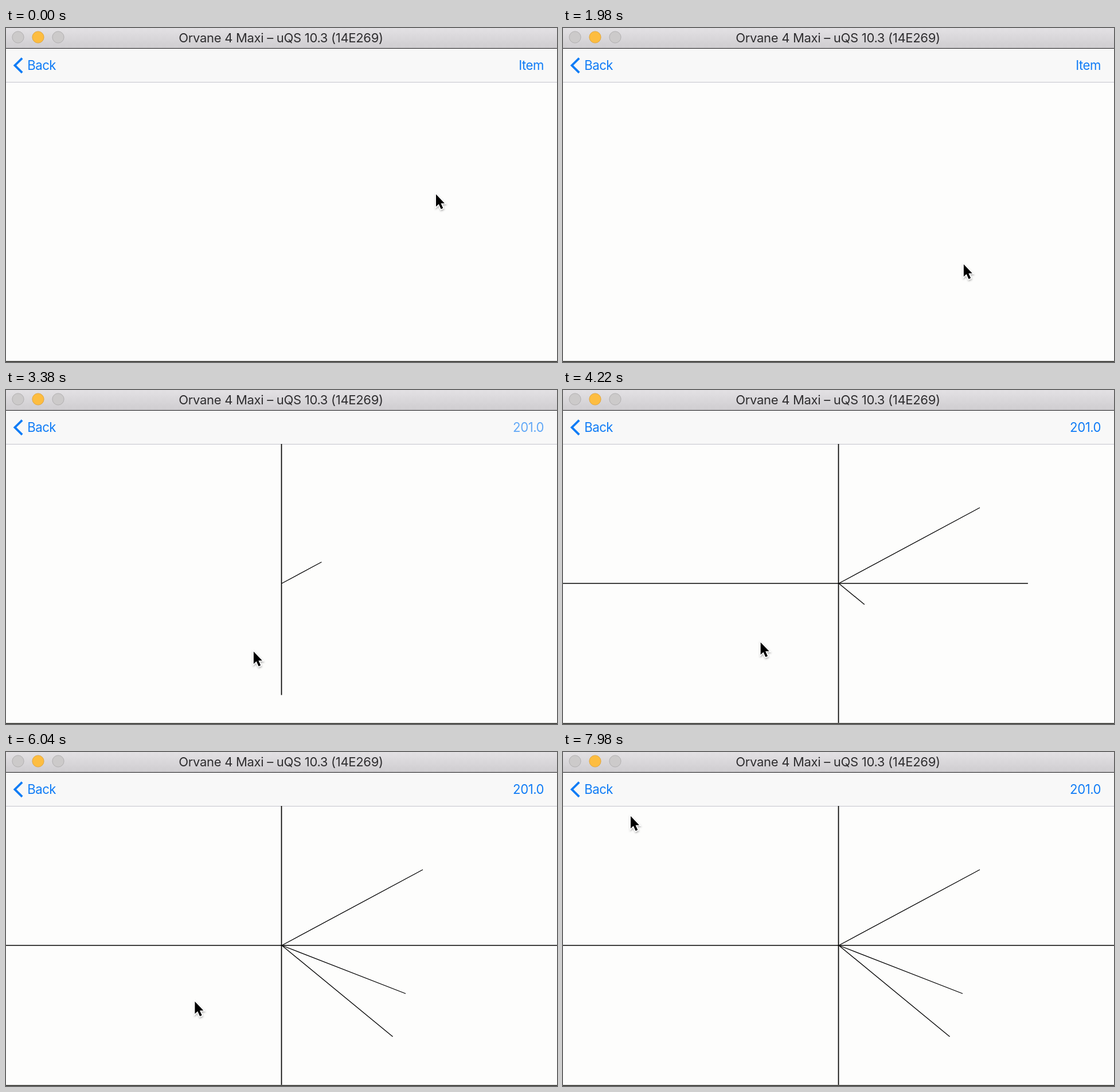
Write an HTML page that moves like this. It is 961 px wide and 582 px high and loops after 8 s.

```html
<!DOCTYPE html>
<html lang="en">
<head>
<meta charset="utf-8">
<title>Axes and rays</title>
<style>
  html, body { margin: 0; width: 100%; height: 100%; overflow: hidden; background: #fdfdfc; }
  svg { display: block; width: 961px; height: 582px; }
  text { font-family: Inter, Roboto, sans-serif; }
  .title { font-size: 22px; letter-spacing: -.3px; fill: #2e2d2f; text-anchor: middle; }
  .nav { font-size: 22.2px; letter-spacing: -.5px; fill: #107cf6; }
  .end { text-anchor: end; }
  .line { stroke: #000; stroke-width: 1.3; }
  .axis { stroke-width: 1.7; }
</style>
</head>
<body>
<svg viewBox="0 0 961 582">
  <defs>
    <linearGradient id="bar" x2="0" y2="1">
      <stop offset="0" stop-color="#e3e1e4"/>
      <stop offset="1" stop-color="#cfcdd0"/>
    </linearGradient>
    <filter id="shadow" x="-50%" y="-50%" width="200%" height="200%">
      <feDropShadow dx="0.5" dy="2" stdDeviation="1.5" flood-opacity=".3"/>
    </filter>
  </defs>

  <rect width="961" height="582" fill="#fdfdfc"/>
  <rect y="36" width="961" height="58" fill="#f8f8f8"/>
  <rect y="94" width="961" height="1" fill="#c4c4cc"/>
  <rect width="961" height="35" fill="url(#bar)"/>
  <rect y="35" width="961" height="1" fill="#1c1c1e"/>
  <g fill="#cccaca" stroke="#b2b0b1">
    <circle cx="21" cy="16" r="10.1"/>
    <circle cx="56" cy="16" r="10.1" fill="#fdbd40" stroke="#e0a640"/>
    <circle cx="91" cy="16" r="10.1"/>
  </g>
  <text class="title" x="479.5" y="24.5">Orvane 4 Maxi – uQS 10.3 (14E269)</text>

  <path d="M28.2 52.6L15.4 65.2L28.2 77.8" fill="none" stroke="#107cf6" stroke-width="3.8"/>
  <text class="nav" x="37.2" y="73">Back</text>
  <text class="nav end" id="label" x="938" y="73">Item</text>

  <g id="lines"></g>
  <rect y="580" width="961" height="1" fill="#777773"/>
  <rect y="581" width="961" height="1" fill="#33332f"/>

  <g id="cursor" filter="url(#shadow)">
    <path d="M0 -1.2V20.3L4.8 15.8L8.7 24.4L12.3 22.8L8.5 14.4H15Z"
          fill="#000" stroke="#fff" stroke-width="3" paint-order="stroke" stroke-linejoin="miter"/>
  </g>
</svg>
<script>
  const LOOP = 8000, DRAW = 890;

  // start time, from x, y, to x, y, class
  const strokes = [
    [2580, 480.5, 94, 480.5, 580, 'line axis'],
    [3470, 0, 337, 961, 337, 'line axis'],
    [3130, 481, 337, 727, 205, 'line'],
    [4015, 481, 337, 674.5, 496, 'line'],
    [4895, 481, 337, 697, 421, 'line']
  ];

  // time, tip x, tip y
  const pointerPath = [
    [0, 750, 291], [1100, 716, 354], [1560, 704, 394], [1980, 699, 413],
    [2400, 640, 434], [3000, 500, 453], [3380, 432, 457], [4200, 345, 441],
    [5160, 328.5, 436], [7120, 330.5, 436], [7440, 290, 362], [7980, 118, 113],
    [8000, 118, 113]
  ];

  const label = document.getElementById('label');
  const cursor = document.getElementById('cursor');
  const group = document.getElementById('lines');
  const clamp = v => Math.min(1, Math.max(0, v));
  const mix = (a, b, p) => a + (b - a) * p;
  const set = (el, attrs) => {
    for (const key in attrs) el.setAttribute(key, attrs[key]);
  };

  const lines = strokes.map(([, x1, y1, , , cls]) => {
    const el = document.createElementNS('http://www.w3.org/2000/svg', 'line');
    set(el, { x1, y1, class: cls });
    return group.appendChild(el);
  });

  function pointerAt(t) {
    const i = pointerPath.findIndex(step => step[0] > t);
    const a = pointerPath[i - 1], b = pointerPath[i];
    const p = (t - a[0]) / (b[0] - a[0]);
    return [mix(a[1], b[1], p), mix(a[2], b[2], p)];
  }

  function render(t) {
    strokes.forEach(([start, x1, y1, x2, y2], i) => {
      const p = clamp((t - start) / DRAW);
      set(lines[i], {
        x2: mix(x1, x2, p),
        y2: mix(y1, y2, p),
        visibility: p > 0 ? 'visible' : 'hidden'
      });
    });

    const measured = t >= 3130;
    label.textContent = measured ? '201.0' : 'Item';
    label.setAttribute('opacity', measured ? mix(.28, 1, clamp((t - 3130) / 500)) : 1);
    cursor.setAttribute('transform', `translate(${pointerAt(t)})`);
  }

  const origin = performance.now();
  function tick() {
    render((performance.now() - origin) % LOOP);
    requestAnimationFrame(tick);
  }
  tick();
</script>
</body>
</html>
```
